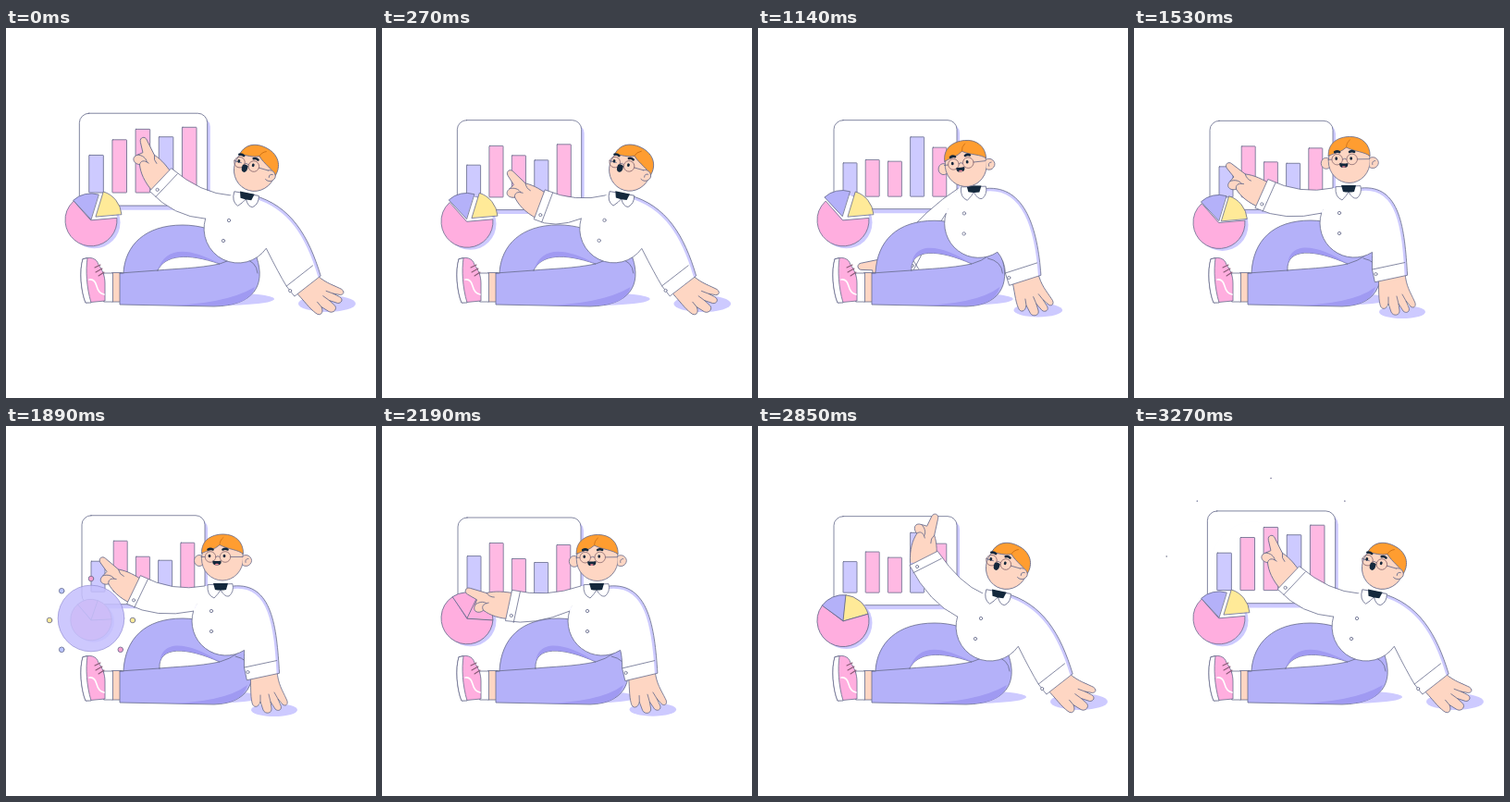
Recreate the animation shown at these times as an HTML page with a canvas. Size 400x400 px, loop 3.3 s.

```html
<!DOCTYPE html>
<html lang="en">
<head>
<meta charset="utf-8">
<title>Chart presenter</title>
<style>
html, body { margin: 0; width: 100%; height: 100%; overflow: hidden; background: #fff; }
canvas { display: block; width: 400px; height: 400px; }
</style>
</head>
<body>
<canvas id="stage"></canvas>
<script>
const LOOP = 3300, STEP = 30;
const LINE = '#666b8c', DARK = '#14283c', SKIN = '#fed6c3', HAIR = '#ff9d30',
  PANTS = '#b4b1f9', SHADE = '#a09af2', LILAC = '#cdcaff', PINK = '#ffaedf',
  BAR = '#ffb9e3', BLUE = '#b9c4ff', YELLOW = '#ffea98', WHITE = '#fff';

const canvas = document.getElementById('stage');
const g = canvas.getContext('2d');
const dpr = window.devicePixelRatio || 1;
canvas.width = canvas.height = 400 * dpr;

// --- timing ---
const rad = deg => deg * Math.PI / 180;
const mix = (a, b, k) => a + (b - a) * k;
function ease(t, from, to) {
  const k = Math.max(0, Math.min(1, (t - from) / (to - from)));
  return k * k * (3 - 2 * k);
}
// Smooth bump around a centre, repeated every period.
function bump(t, centre, width, period = LOOP) {
  const d = Math.abs(((t - centre) % period + 1.5 * period) % period - period / 2);
  return d < width ? Math.cos(Math.PI * d / width / 2) ** 2 : 0;
}
const bob = (t, start) => Math.sin(2 * Math.PI * (t - start) / (LOOP / 3));

// --- drawing ---
function paint(p, fill, stroke = LINE, width = .8, rule = 'nonzero') {
  if (fill) { g.fillStyle = fill; g.fill(p, rule); }
  if (stroke) { g.strokeStyle = stroke; g.lineWidth = width; g.stroke(p); }
}
const draw = (d, ...style) => paint(new Path2D(d), ...style);
function oval(x, y, rx, ry, fill, stroke = null) {
  const p = new Path2D();
  p.ellipse(x, y, rx, ry, 0, 0, 7);
  paint(p, fill, stroke);
}
function box(x, y, w, h, r, fill, stroke) {
  const p = new Path2D();
  p.roundRect(x, y, w, h, r);
  paint(p, fill, stroke);
}
function sector(from, to, gap, fill, stroke) {
  const mid = rad((from + to) / 2), x = gap * Math.cos(mid), y = gap * Math.sin(mid);
  const p = new Path2D();
  p.moveTo(x, y);
  p.arc(x, y, 28, rad(from), rad(to));
  p.closePath();
  paint(p, fill, stroke);
}
function placed(x, y, deg, scale, fn) {
  g.save();
  g.translate(x, y);
  g.rotate(rad(deg));
  g.scale(scale, scale);
  fn();
  g.restore();
}
function faded(alpha, fn) {
  g.globalAlpha = alpha;
  fn();
  g.globalAlpha = 1;
}

// --- chart, pie and tap effects ---
function dots(p, x, y, sx, sy) {
  if (p <= 0 || p >= 1) return;
  const r = 20 + 39 * (1 - (1 - p) ** 2), size = 4.7 * (1 - p);
  for (let k = 0; k < 8; k++) {
    const c = Math.cos(k * Math.PI / 4), s = Math.sin(k * Math.PI / 4);
    oval(x + r * sx * c, y + r * sy * s, size, size, k % 4 === 0 ? YELLOW : c < -.1 ? BLUE : '#f79fd0', LINE);
  }
}
function ripple(p, x, y, size) {
  if (p <= 0 || p >= 1) return;
  const r = size * (1 - (1 - p) ** 2);
  faded(Math.min(.88, 2.4 * (1 - p) ** 2), () => oval(x, y, r, r, '#c5c0fd', '#8f8bd0'));
}

// height, growth on tap, extra swing, time of swing
const BARS = [[33, 6, 26, 810], [55, 0, -21, 990], [38, 28, 0, 0], [34, 24, 31, 1180], [53, 15, 0, 0]];

function panel(t, p) {
  const tap = bump(t, 0, 400);
  placed(148.5, 147 - 5 * tap - 2.3 * bob(t, 540), 0, 1 + .04 * tap, () => {
    box(-63, -44, 132.5, 96.5, 10, LILAC, null);
    box(-66.5, -48, 133, 96, 10, WHITE);
    ripple(p, -18, 8, 45);
    BARS.forEach(([base, grow, swing, when], i) => {
      const h = base + grow * tap + swing * bump(t, when, 430, LOOP / 2);
      box(-56.5 + 24.2 * i, 34.5 - h, 15, h, .5, i % 3 ? BAR : LILAC);
    });
  });
}

function pie(t) {
  const shut = ease(t, 1350, 1700), open = ease(t, 2900, 3240);
  const blue = 1 + 3.5 * ease(t, 0, 500) - 4.5 * shut + open, yellow = 6.5 * (1 - shut + open);
  const pink = ease(t, 1700, 1830) - ease(t, 2460, 2850);
  const turn = 11 * ease(t, 1700, 2400) - 22 * ease(t, 2460, 2850) + 11 * open;
  placed(92, 209.3 - 1.5 * bob(t, -275), 0, 1 - .22 * bump(t, 1860, 200), () => {
    oval(3.5, 2.5, 28, 28, LILAC);
    g.rotate(rad(turn));
    if (yellow > .2) sector(227, 355, 0, WHITE, null);
    sector(-5, 227, 0, PINK);
    for (const [from, to, gap, color] of [[227, 287, blue, PANTS], [287, 355, yellow, YELLOW]]) {
      sector(from, to, gap, color, null);
      faded(pink, () => sector(from, to, gap, PINK, null));
      sector(from, to, gap, null);
    }
  });
}

// --- man ---
// wrist x, y, hand turn
const TAP_CHART = [167, 164, -33], DOWN = [178, 256, -100], SLIDE = [157, 251, -108],
  LIFT = [138, 177, -56], TAP_PIE = [137, 194, -80], RAISE = [179, 143, 6];
const MOVES = [[0, TAP_CHART], [120, TAP_CHART], [540, DOWN], [1040, DOWN], [1140, SLIDE], [1480, LIFT],
  [1710, TAP_PIE], [1890, LIFT], [2200, TAP_PIE], [2460, TAP_PIE], [2850, RAISE], [3060, TAP_CHART], [LOOP, TAP_CHART]];

function wristAt(t) {
  const i = MOVES.findIndex(m => m[0] > t), [t0, a] = MOVES[i - 1], [t1, b] = MOVES[i];
  return a.map((v, k) => mix(v, b[k], ease(t, t0, t1)));
}

// Two key poses: leaning back (0) and upright (1); the trunk moves ahead of the arm.
function rigAt(t) {
  const lean = .43 * ease(t, 180, 540) + .57 * ease(t, 980, 1260) - .09 * ease(t, 1950, 2400)
    - .91 * ease(t, 2460, 2790) - .11 * bump(t, 180, 180);
  const sway = lean < 0 ? lean : 1 - (1 - lean) ** 2;
  const chest = { x: mix(251, 238, sway), y: mix(217, 211, sway), r: 37 };
  const neck = { x: mix(260, 232, sway), y: mix(182, 174, sway), turn: 12 * (1 - sway) };
  const wrist = { x: mix(326, 278, lean), y: mix(279, 271, lean), turn: mix(-38, -12, lean) };
  const side = { x: chest.x + chest.r * Math.cos(rad(197)), y: chest.y + chest.r * Math.sin(rad(197)) };
  return { t, lean, sway, chest, neck, wrist, side };
}

function pointingArm({ t, neck, side }) {
  const [x, y, hand] = wristAt(t);
  const sx = neck.x - 17, sy = neck.y - 1;
  // the forearm bends up a little from the shoulder line
  const a = Math.atan2(y - (sy + side.y) / 2, x - (sx + side.x) / 2) + rad(18);
  const nx = Math.cos(a), ny = Math.sin(a), sag = 13 * Math.tanh((225 - y) / 25);
  const ax = x - 17 * ny, ay = y + 17 * nx, bx = x + 17 * ny, by = y - 17 * nx;
  placed(x, y, hand, 1, () => {
    draw('M-14,6C-16,-8 -14,-18 -10,-26C-15,-30 -14,-38 -6,-36L0,-35L4,-46C6,-51 12,-49 11,-44L9,-26C13,-17 14,-8 14,6', SKIN);
    draw('M-10,-26C-7,-29 -3,-28 -1,-22M-6,-36C-2,-33 0,-28 -2,-24M9,-26Q5,-22 6,-17', null);
  });
  draw(`M${sx},${sy}Q${(sx + ax) / 2},${(sy + ay) / 2 + sag} ${ax},${ay}L${bx},${by}
    Q${(bx + side.x) / 2 - sag / 3},${(by + side.y) / 2 + sag} ${side.x},${side.y}`, WHITE);
  draw(`M${ax - 9 * nx},${ay - 9 * ny}L${bx - 9 * nx},${by - 9 * ny}`, null);
  oval(mix(bx, ax, .2) - 5 * nx, mix(by, ay, .2) - 5 * ny, 1.6, 1.6, WHITE, LINE);
}

function legs({ sway }) {
  draw('M115,264.5H125V296H115Z', SKIN);
  draw('M106,265H115.5V296H106Z', WHITE);
  draw('M83,250C90,247 98,248 100,256C104,261 107,268 107,276L107,295L86,297C81,285 79,262 83,250Z', PINK);
  draw('M83,250C79,262 81,285 86,297L92,297C87,280 86,262 88,249Z', WHITE);
  draw('M90,272Q96,271 98,279T106,288', null, WHITE, 1.6);
  draw('M96,259L102,256M97,264L104,260M100,268L106,264', null, '#8a5a76', 1.1);

  const knee = 213 - 5 * sway, hip = 271 - 8 * sway, rise = 8 * sway, left = 164 + 2 * sway;
  const hole = `M${left},262C${172 - rise},${245 - rise} 196,${243 - rise / 2} 231,255`;
  draw(`M127,264C129,${knee + 22} 150,${knee} 191,${knee}C228,${knee} 255,235 ${hip},248
    C${hip + 10},278 ${hip - 3},300 225,301L123,299V265H127Z${hole}C207,260 185,260 ${left},262Z`, PANTS, LINE, .8, 'evenodd');
  draw(`${hole}C196,${236 - rise / 2} ${172 - rise},${237 - rise} ${left},262Z`, SHADE, null);
  draw(`M165,300Q235,300 ${hip - 2},280Q${hip - 8},301 225,300Z`, SHADE, null);
  draw(`M123,265L${left},262M231,255Q242,252 250,246M${hip - 15},249Q${hip},252 ${hip + 1},265`, null);
}

function trunk({ lean, sway, chest, neck, wrist, side }) {
  const back = 1 - sway, c = Math.cos(rad(wrist.turn)), s = Math.sin(rad(wrist.turn));
  const out = { x: wrist.x + 18 * c, y: wrist.y + 18 * s }, inn = { x: wrist.x - 18 * c, y: wrist.y - 18 * s };
  const cuff = { x: 14 * s, y: -14 * c }, pit = rad(mix(35, 58, sway));
  const top = { x: inn.x + cuff.x, y: inn.y + cuff.y };
  const px = chest.x + chest.r * Math.cos(pit), py = chest.y + chest.r * Math.sin(pit);
  const outer = `${out.x},${out.y}C${out.x - 3 - 10 * back},${out.y - 50 + 7 * back}
    ${neck.x + 56 - 8 * back},${neck.y - 5 + 15 * back} ${neck.x + 14 - 6 * back},${neck.y - 1}`;
  const outline = `M${side.x},${side.y}A37,37 0 0 0 ${px},${py}
    Q${top.x - 8 * back},${top.y - 13} ${top.x},${top.y}L${inn.x},${inn.y}L${outer}`;
  const shape = new Path2D(`${outline}L${neck.x - 17},${neck.y - 1}Z`);

  placed(wrist.x, wrist.y, -40 * (1 - lean), 1, () => {
    draw('M-14,-5C-13,10 -14,20 -12,28C-11,34 -5,34 -3,27L0,36C2,41 10,40 9,34L8,27L13,35C16,38 21,36 19,31L16,24L21,30C25,33 28,29 25,24C21,15 16,8 15,-6Z', SKIN);
    draw('M-3,27L-3,20M8,27L6,19M16,24L12,17', null);
  });
  paint(shape, WHITE, null);
  g.save();
  g.clip(shape);
  draw('M' + outer, null, LILAC, 6);
  g.restore();
  draw(outline, null);
  draw(`M${top.x},${top.y}L${out.x + cuff.x},${out.y + cuff.y}`, null);
  oval(top.x + 4, top.y + 5, 1.6, 1.6, WHITE, LINE);
  oval(neck.x - 10 - 9 * back, neck.y + 26, 1.7, 1.7, WHITE, LINE);
  oval(neck.x - 10 - 15 * back, neck.y + 48, 1.7, 1.7, WHITE, LINE);
  placed(neck.x, neck.y, neck.turn, 1, () => {
    draw('M-14,-2Q-15,9 -7,12Q-2,7 0,3Q4,11 9,10Q15,5 13,-3Z', WHITE);
    draw('M-8,-4L8,-4L6,3Q0,4 -6,3Z', DARK, null);
  });
}

function head({ t, sway }) {
  const back = 1 - sway, nod = bump(t, 1140, 500) + .5 * bump(t, 2460, 400);
  const lookX = -5 - 5 * back, earL = -25 + 9 * back, earR = 25 - 8 * back;
  placed(234 + 35 * back - 11 * nod, 143.5 + 9.5 * back + 4 * nod, 16 * back - 7 * nod, 1, () => {
    oval(earL, 2, 5.5, 6, SKIN, LINE);
    oval(0, 0, 22.5, 23.5, SKIN, LINE);
    placed(0, 0, 14 * back, 1, () => {
      draw('M-22.5,-6C-23,-20 -12,-26.5 1,-26.5C14,-26.5 23,-18 22.5,-5C17,-10 6,-10 -3,-15C-8,-10 -16,-9 -22.5,-6Z', HAIR);
      draw('M-3,-15Q-3,-20 1,-23', null, '#c96d14');
    });
    placed(earR, 2, 0, 1, () => {
      draw('M-3,-5A6,6 0 1 1 -3,5', SKIN);
      draw('M3,-2Q-1,-2 0,2', null);
    });
    placed(lookX, -2 - back, 0, 1, () => {
      draw(`M14,0H${earR - lookX - 3}M-14,0H${Math.max(-18, earL - lookX)}M-2,0Q0,-2 2,0`, null);
      for (const x of [-8, 8]) {
        oval(x, 0, 5.8, 5.8, null, '#8a6a70');
        oval(x - 1, -1, 1.4, 1.8, DARK);
        draw(`M${x - 2.5},-8Q${x},-9.5 ${x + 2.5},-8`, null, DARK, 2.6);
      }
      const w = 4.5 - 1.5 * back, lip = 4 - 2.5 * back;
      draw(`M${-1 - w},${lip}Q-1,${lip + 1 - 3 * back} ${w - 1},${lip}Q${w},9 -1,9Q${-2 - w},9 ${-1 - w},${lip}Z`, DARK, null);
      if (back < .5) oval(-1, 8, 2, .8, '#f58b9b');
    });
  });
}

function render(t) {
  const rig = rigAt(t), { lean, sway } = rig;
  const pieTap = (t - 1710) / 450, chartTap = (t - 2940) / 355;
  g.setTransform(dpr, 0, 0, dpr, 0, 0);
  g.fillStyle = WHITE;
  g.fillRect(0, 0, 400, 400);
  g.lineJoin = g.lineCap = 'round';
  dots(chartTap, 148, 141, 1.92, 1.44);
  panel(t, chartTap);
  pie(t);
  ripple(pieTap, 92, 208, 56);
  dots(pieTap, 92, 210, 1, 1);
  oval(230 - 15 * sway, 293, 60, 7, LILAC);
  oval(mix(347, 290, lean), mix(298, 307, lean), mix(31, 25, lean), mix(9, 7, lean), LILAC);
  pointingArm(rig);
  legs(rig);
  trunk(rig);
  head(rig);
}

function frame(now) {
  render(Math.floor(now % LOOP / STEP) * STEP);
  requestAnimationFrame(frame);
}
requestAnimationFrame(frame);
</script>
</body>
</html>
```
